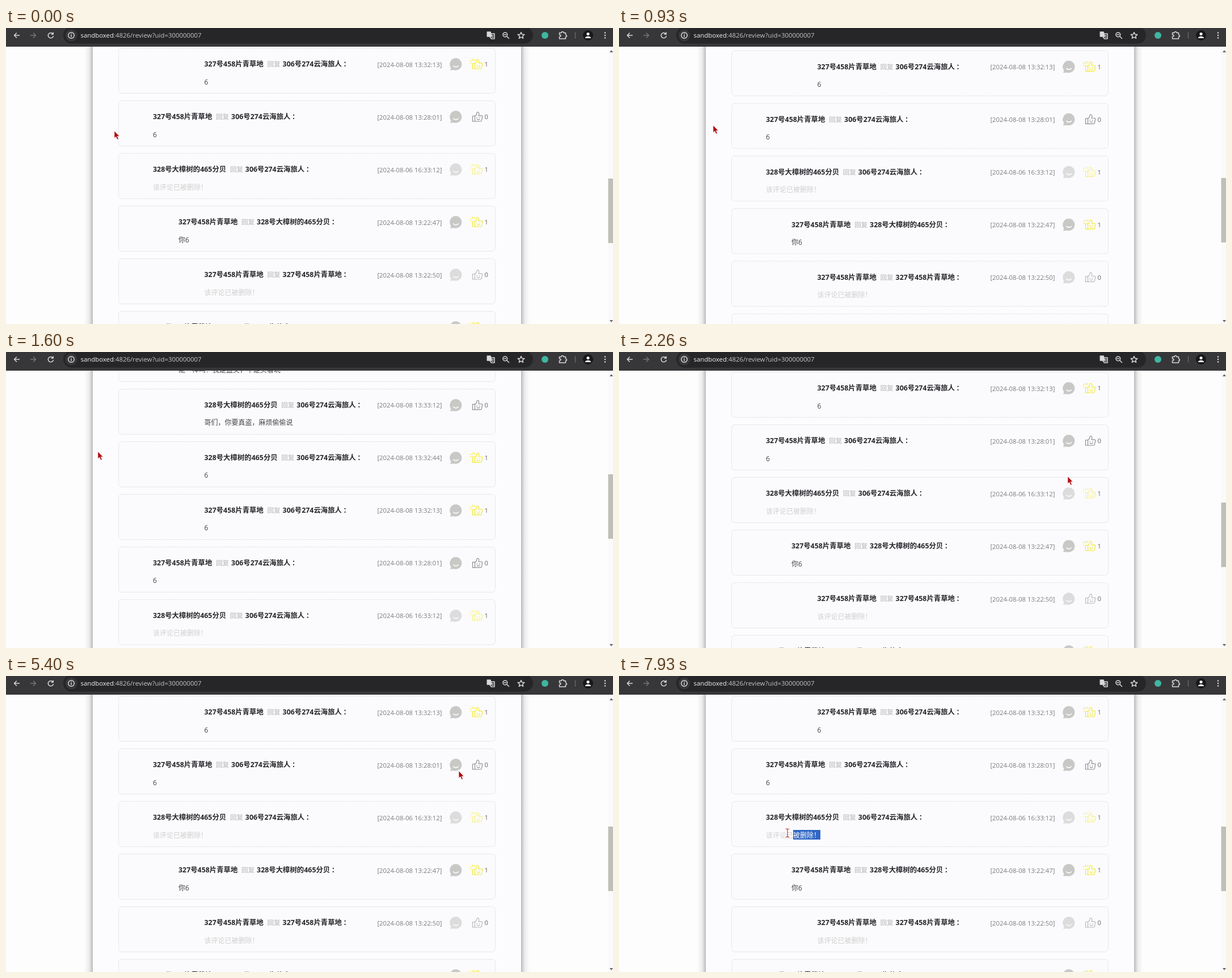
These frames come from a looping animation (1070 by 523 pixels, 8 s). An HTML page:

```html
<!DOCTYPE html>
<html lang="zh-CN">
<head>
<meta charset="utf-8">
<style>
html, body { margin: 0; width: 100%; height: 100%; overflow: hidden; background: #fdfdfd; }
svg { display: block; width: 1070px; height: 523px; }
text { font: 12px "Open Sans", "Noto Sans CJK SC", "Noto Sans CJK", sans-serif; fill: #444; }
.head { font-size: 12.4px; font-weight: 700; fill: #26262a; }
.reply { font-size: 11.7px; fill: #cacacc; }
.time { font-size: 11.3px; fill: #7c7c80; text-anchor: end; }
.count { font-size: 11.3px; fill: #666; }
.gone { fill: #cfcfcd; }
.picked { fill: #fff; }
.line { fill: none; stroke-width: 1.2; stroke-linejoin: round; stroke-linecap: round; }
.bar { stroke: #d8d8d8; stroke-width: 1.5; }
</style>
</head>
<body>
<svg viewBox="0 0 1070 523">
  <defs>
    <linearGradient id="shade">
      <stop offset="0" stop-color="#888" stop-opacity="0"/>
      <stop offset=".55" stop-color="#888" stop-opacity=".14"/>
      <stop offset=".85" stop-color="#888" stop-opacity=".4"/>
      <stop offset="1" stop-color="#888" stop-opacity=".6"/>
    </linearGradient>
    <clipPath id="pick"><rect id="pickClip" y="260" width="100" height="40"/></clipPath>
    <g id="bubble">
      <path d="M0-10.7A10.7 10.7 0 1 1-3.5 10.2L-10 10.7L-8.6 6.4A10.7 10.7 0 0 1 0-10.7Z" fill="#c8c8c6"/>
      <path d="M-4.2 3Q0 7 4.2 3" fill="none" stroke="#fff" stroke-width="1.6" stroke-linecap="round"/>
    </g>
    <g id="thumb" class="line">
      <path d="M-8.5-1.5H-4.5V8H-8.5ZM-4.5-1.5C-1.5-3-1-5-1-7.2C-.8-9.2 2.8-9 2.8-5.5L2.2-2.2H7Q9-2 8.6 0L7.4 6.4Q7 8 5.4 8H-4.5"/>
      <path d="M-.8 1V2M4 1V2M-.6 4.2Q1.6 6 3.8 4.2"/>
    </g>
    <path id="spark" class="line" d="M-12.5-6.5L-10.5-5.5M-9-9L-7.5-6.5M-4.5-8.8L-4.8-6.5M-12.5-2H-11"/>
  </defs>

  <rect width="1070" height="523" fill="#fdfdfd"/>
  <rect x="153" width="755" height="523" fill="#fcfcff"/>
  <rect x="138" width="15" height="523" fill="url(#shade)"/>
  <rect width="15" height="523" fill="url(#shade)" transform="translate(923) scale(-1 1)"/>

  <g id="list"></g>

  <g id="pickText">
    <rect id="pickBox" y="272" height="17" fill="#2f66c4"/>
    <text class="picked" x="259" y="285.500" clip-path="url(#pick)">该评论已被删除！</text>
  </g>
  <g id="pickCount">
    <rect x="843.5" y="242" width="7" height="16" fill="#2f66c4"/>
    <text class="count picked" x="843.5" y="254.2">1</text>
  </g>

  <rect x="1061" y="33" width="9" height="490" fill="#fafafa"/>
  <rect id="handle" x="1061.5" width="8.5" height="114" fill="#bfbfba"/>
  <path d="M1064 43L1067 39L1070 43ZM1064 516L1067 520L1070 516Z" fill="#666"/>

  <rect width="1070" height="33" fill="#37373a"/>
  <rect x="101" y="-2" width="828" height="29.5" rx="14.5" fill="#262628"/>
  <circle cx="115" cy="13" r="10.5" fill="#37373a"/>
  <g class="line bar">
    <path d="M23.500 13H14.500M18.500 9L14.500 13L18.500 17"/>
    <path d="M43.500 13H52.500M48.500 9L52.500 13L48.500 17" stroke="#77777a"/>
    <path d="M82.700 10.500A4.600 4.600 0 1 0 83.300 14.500M83.200 8V11H80"/>
    <circle cx="115" cy="13" r="5.200"/><path d="M115 12.500V15.500M115 10.300V10.400"/>
    <path d="M853 10H861V19H855.500L853 15.500M856.500 13H859M856.500 16H859"/>
    <path d="M848.300 7H854L856 15H848.300Z" fill="#d8d8d8"/>
    <circle cx="879.800" cy="11.800" r="3.900"/><path d="M883 15L886.500 18.500M878 11.800H881.500"/>
    <path d="M908 7.500L909.700 11.200L913.700 11.600L910.700 14.300L911.600 18.300L908 16.200L904.400 18.300L905.300 14.300L902.300 11.600L906.300 11.200Z"/>
    <path d="M975.500 8.500H979Q979 6.500 981 6.500Q983 6.500 983 8.500H986.500V12Q988.500 12.500 988.500 14Q988.500 15.500 986.500 15.500V19H975.500V15.500Q978 15 978 13.500Q978 12 975.500 12Z"/>
    <path d="M1003.500 8V18" stroke="#66666a"/>
  </g>
  <circle cx="950" cy="13" r="6" fill="#3fb6a0"/>
  <circle cx="1026" cy="13" r="9" fill="#18181a"/>
  <circle cx="1026" cy="10.500" r="2.600" fill="#eee"/>
  <path d="M1021 18V16.500Q1026 12.500 1031 16.500V18Z" fill="#eee"/>
  <g fill="#d8d8d8"><circle cx="1056" cy="8.500" r="1.300"/><circle cx="1056" cy="13" r="1.300"/><circle cx="1056" cy="17.500" r="1.300"/></g>
  <text x="131.500" y="17.300" style="font-size:11.4px;fill:#c6c6c8"><tspan fill="#f2f2f2">sandboxed</tspan>:4826/review?uid=300000007</text>

  <g id="pointer">
    <path id="arrow" d="M0 0V12.500L2.900 10L5 15L7.200 14L5.100 9.300H8.900Z" fill="#b00c10" stroke="#fff" stroke-width=".5"/>
    <path id="hand" d="M-1.500.5Q0-1 1.300.5V6L6 7Q7.500 7.500 7.300 9.500L6.300 14V17H-2V14.500L-6 9.500Q-5.800 7.300-4 8.500L-1.500 10.500Z" fill="#b00c10" stroke="#fff" stroke-width=".5"/>
    <path id="beam" class="line" d="M-3-7Q0-7 0-5.500Q0-7 3-7M0-5.500V6M-3 7.500Q0 7.500 0 6Q0 7.500 3 7.500" stroke="#c83a34"/>
  </g>
</svg>
<script>
const LOOP = 8000, PITCH = 93, FIRST = 64, ICON_X = 793;
const grass = "327号458片青草地", cloud = "306号274云海旅人", tree = "328号大樟树的465分贝";
const gone = "该评论已被删除！";

// row position, indent, author, addressee, text, time, likes
const rows = [
  [-3, 304, cloud, tree, "能一样吗？我是盗奖，不是买着玩", "08 13:32:58", 0],
  [-2, 349.5, tree, cloud, "哥们，你要真盗，麻烦偷偷说", "08 13:33:12", 0],
  [-1, 349.5, tree, cloud, "6", "08 13:32:44", 1],
  [0, 349.5, grass, cloud, "6", "08 13:32:13", 1],
  [1, 259, grass, cloud, "6", "08 13:28:01", 0],
  [2, 259, tree, cloud, gone, "06 16:33:12", 1],
  [3, 304, grass, tree, "你6", "08 13:22:47", 1],
  [4, 349.5, grass, grass, gone, "08 13:22:50", 0],
  [5, 259, grass, cloud, "6", "08 13:20:36", 1]
];

const $ = id => document.getElementById(id);

function card([pos, x, who, to, body, time, likes]) {
  const y = FIRST + PITCH * pos, dead = body === gone;
  const tint = likes ? "#f4ea2a" : "#8e8e8e";
  return `<g transform="translate(0 ${y})">
    <rect x="198.5" y="-28.5" width="664" height="80" rx="6" fill="#fbfbfe" stroke="#dededf" stroke-dasharray="2 1"/>
    <text class="head" x="${x}" y="4.400">${who}<tspan class="reply" dx="6.500">回复</tspan><tspan dx="3.800">${to}</tspan><tspan dx="2.500">：</tspan></text>
    <text class="${dead ? "gone" : ""}" x="${x}" y="35.500">${body}</text>
    <text class="time" x="768.500" y="4.500">[2024-08-${time}]</text>
    <g opacity="${dead ? .6 : 1}">
      <g class="icon" transform="translate(${ICON_X} 0)"><use href="#bubble"/></g>
      <g transform="translate(831 0)" stroke="${tint}"><use href="#thumb"/>${likes ? '<use href="#spark"/>' : ""}</g>
    </g>
    <text class="count" x="843.500" y="4.200">${likes}</text>
  </g>`;
}
$("list").innerHTML = rows.map(card).join("");
const icons = [...document.querySelectorAll(".icon")];

const scrollKeys = [[0, 0], [150, 0], [480, 216], [620, 216], [960, 0], [1150, 0], [1450, 216], [1600, 216], [1740, 0]];
const pointKeys = [
  [0, 191, 182], [60, 191, 182], [930, 166, 172], [1600, 162, 176], [1800, 162, 177],
  [2260, 791, 220], [2600, 796, 300], [3000, 797, 345], [3350, 838, 428], [3680, 850, 248],
  [3900, 842, 250], [4180, 797, 164], [5300, 797, 164], [5900, 812, 215], [6400, 801, 258],
  [7060, 801, 258], [7700, 356, 279], [7800, 350, 279], [7930, 297, 277]
];

function sample(keys, t) {
  const i = keys.findIndex(k => k[0] > t);
  if (i < 0) return keys[keys.length - 1].slice(1);
  const a = keys[i - 1], b = keys[i];
  const p = (t - a[0]) / (b[0] - a[0]), e = p * p * (3 - 2 * p);
  return a.slice(1).map((v, n) => v + (b[n + 1] - v) * e);
}

const show = (id, on) => $(id).setAttribute("display", on ? "inline" : "none");

function draw(t) {
  const [scroll] = sample(scrollKeys, t);
  const [x, y] = sample(pointKeys, t);
  $("list").setAttribute("transform", `translate(0 ${scroll})`);
  $("handle").setAttribute("y", 266 - scroll * .2315);

  let over = false;
  rows.forEach((row, i) => {
    const cy = FIRST + PITCH * row[0] + scroll;
    const hit = row[4] !== gone && Math.hypot(x - ICON_X, y - cy) < 11;
    over = over || hit;
    icons[i].setAttribute("transform", `translate(${ICON_X} 0) scale(${hit ? 1.12 : 1})`);
  });

  const typing = t >= 7680;
  show("beam", typing);
  show("hand", over && !typing);
  show("arrow", !over && !typing);
  $("pointer").setAttribute("transform", `translate(${x} ${y})`);

  show("pickCount", t >= 3700 && t < 4500);
  const left = 259 + 12 * Math.ceil((x - 259) / 12);
  show("pickText", t >= 7790);
  $("pickBox").setAttribute("x", left);
  $("pickBox").setAttribute("width", Math.max(0, 355 - left));
  $("pickClip").setAttribute("x", left);
}

const start = performance.now();
function tick() {
  draw((performance.now() - start) % LOOP);
  requestAnimationFrame(tick);
}
tick();
</script>
</body>
</html>
```
